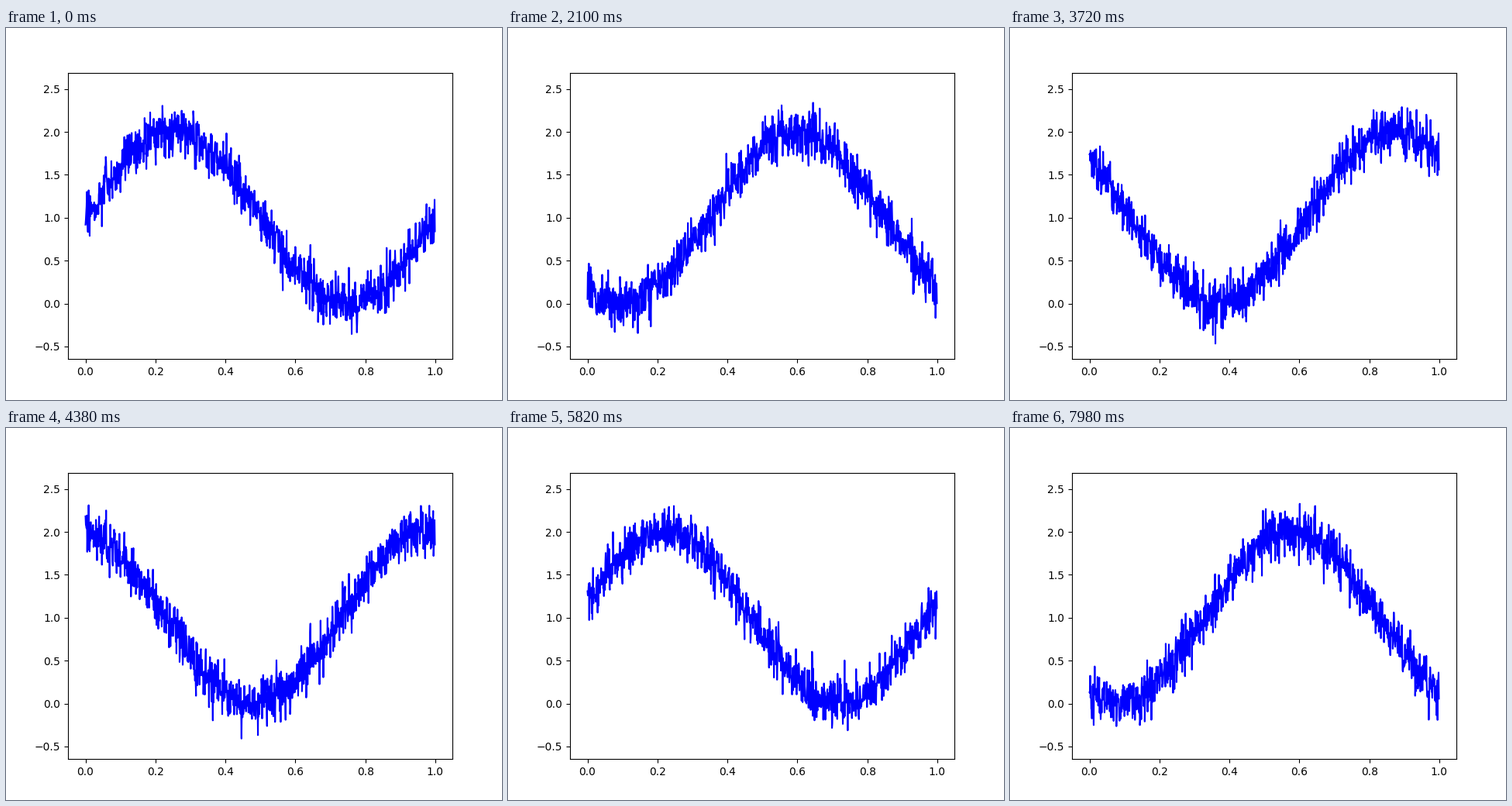
A matplotlib script for the animation above (8 s loop, 640 by 480 pixels).

```python
import matplotlib.pyplot as plt
import numpy as np
from matplotlib.animation import FuncAnimation

TICK_MS = 20
TICKS = 400
TICKS_PER_STEP = 3     # the wave moves every 60 ms
SHIFT = 0.01           # phase shift per step, in wavelengths
NOISE = 0.1

x = np.arange(0, 1, 0.001)


def noise(*seed):
    return np.random.default_rng(seed).normal(0, NOISE, x.size)


texture = noise(12)    # noise that stays the same in every step


def signal(step):
    wave = 1 + np.sin(2 * np.pi * (x - SHIFT * step))
    return wave + texture + noise(5, step)


fig, ax = plt.subplots(figsize=(6.4, 4.8), dpi=100)
line, = ax.plot(x, signal(0), "b", lw=1.5)
ax.set_ylim(-0.647, 2.691)


def update(tick):
    line.set_ydata(signal(tick // TICKS_PER_STEP))
    return line,


anim = FuncAnimation(fig, update, frames=TICKS, interval=TICK_MS,
                     repeat=True, repeat_delay=0, blit=True)
plt.show()
```
